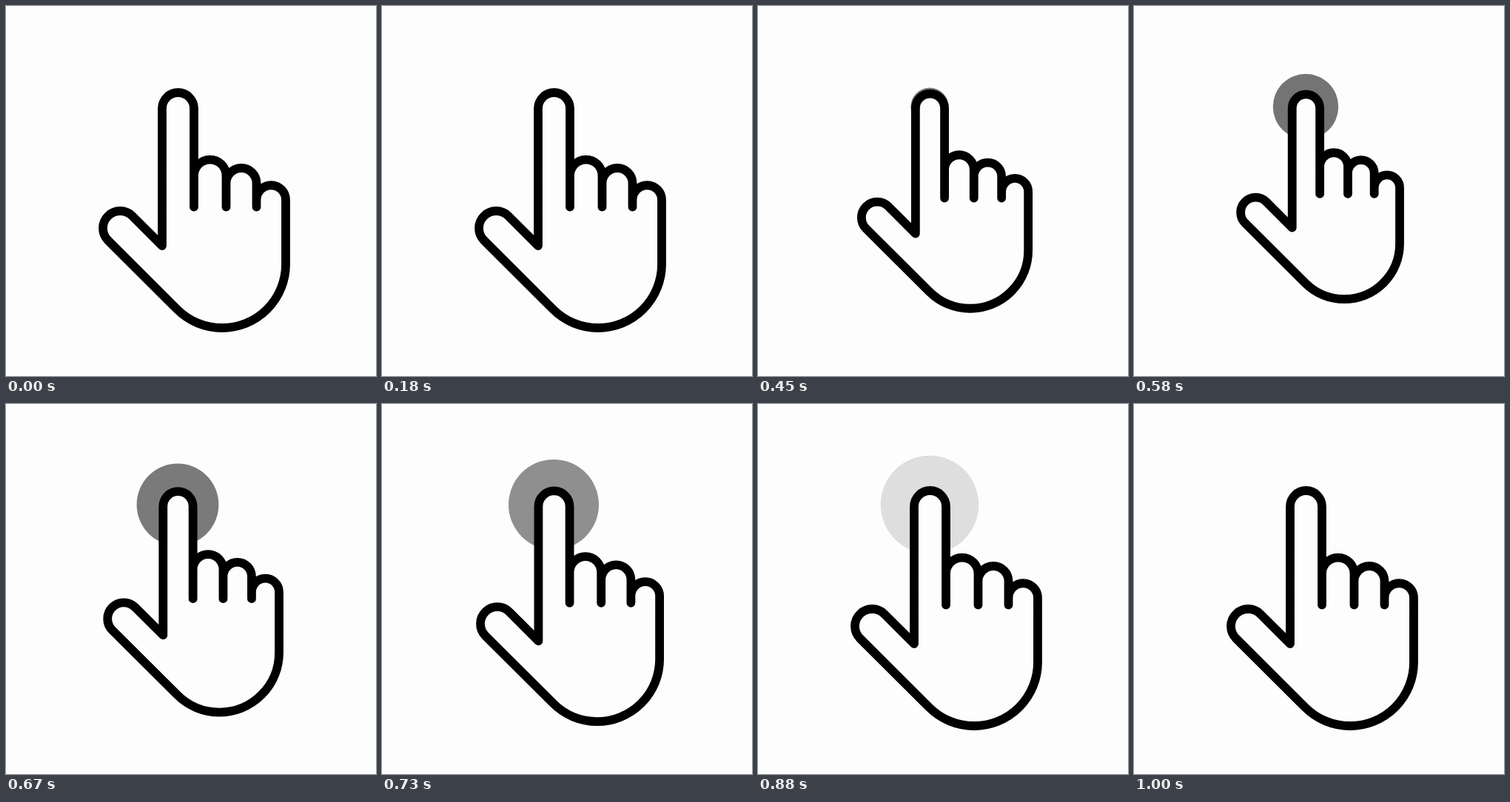
An HTML page with a canvas for the animation above (1.27 s loop, 500 px wide and 500 px high).

```html
<!DOCTYPE html>
<html lang="en">
<head>
<meta charset="utf-8">
<title>Tap</title>
<style>
html, body { margin: 0; width: 100%; height: 100%; overflow: hidden; background: #fdfdfd; }
canvas { display: block; width: 500px; height: 500px; }
</style>
</head>
<body>
<canvas id="stage" width="500" height="500"></canvas>
<script>
const ctx = document.getElementById("stage").getContext("2d");
const PAPER = "#fdfdfd";
const LOOP = 1270;
const TIP = { x: 232, y: 136 };
const STEPS = [0, 180, 240, 300, 330, 360, 390, 420, 450, 520, 550, 580, 610,
  640, 670, 700, 730, 760, 790, 850, 880, 910, 940, 970, 1000];

const clamp = v => Math.min(1, Math.max(0, v));
const ease = (t, from, to) => (1 - Math.cos(Math.PI * clamp((t - from) / (to - from)))) / 2;

function makeHand() {
  const p = new Path2D();
  const { PI } = Math;
  const knuckle = (left, right, y) => p.arc((left + right) / 2, y, (right - left) / 2, PI, 2 * PI);
  p.moveTo(211, 324);
  knuckle(211, 254, 138.5);
  knuckle(254, 297.5, 229.3);
  knuckle(297.5, 338.5, 239.5);
  knuckle(338.5, 378, 262);
  p.arc(292, 349, 86, 0, PI * 0.75);               // palm
  p.arc(154.3, 300.3, 23.3, PI * 0.75, PI * 1.75); // thumb
  p.closePath();
  for (const [x, y] of [[254, 138.5], [297.5, 229.3], [338.5, 239.5]]) {
    p.moveTo(x, y);
    p.lineTo(x, 271.5);
  }
  return p;
}

const hand = makeHand();

function handScale(t) {
  const d = clamp(Math.abs(t - 545) / 320);
  return 1 - 0.1378 * Math.cos(d * Math.PI / 2) ** 4;
}

function drawRipple(t) {
  const alpha = 0.54 * (1 - ease(t, 620, 1000));
  ctx.fillStyle = `rgba(0, 0, 0, ${alpha.toFixed(4)})`;
  ctx.beginPath();
  ctx.arc(TIP.x, TIP.y, 66.3 * ease(t, 145, 860), 0, 2 * Math.PI);
  ctx.fill();
}

// The outline keeps its weight while the shape shrinks.
function drawHand(t) {
  const shape = new Path2D();
  shape.addPath(hand, new DOMMatrix().scale(handScale(t), handScale(t), 1, TIP.x, TIP.y));
  ctx.fillStyle = PAPER;
  ctx.fill(shape);
  ctx.strokeStyle = "#000";
  ctx.lineWidth = 11.8;
  ctx.lineCap = ctx.lineJoin = "round";
  ctx.stroke(shape);
}

function draw(time) {
  const t = STEPS.findLast(step => step <= time);
  ctx.fillStyle = PAPER;
  ctx.fillRect(0, 0, 500, 500);
  drawRipple(t);
  drawHand(t);
}

const start = performance.now();
function tick() {
  draw((performance.now() - start) % LOOP);
  requestAnimationFrame(tick);
}
tick();
</script>
</body>
</html>
```
